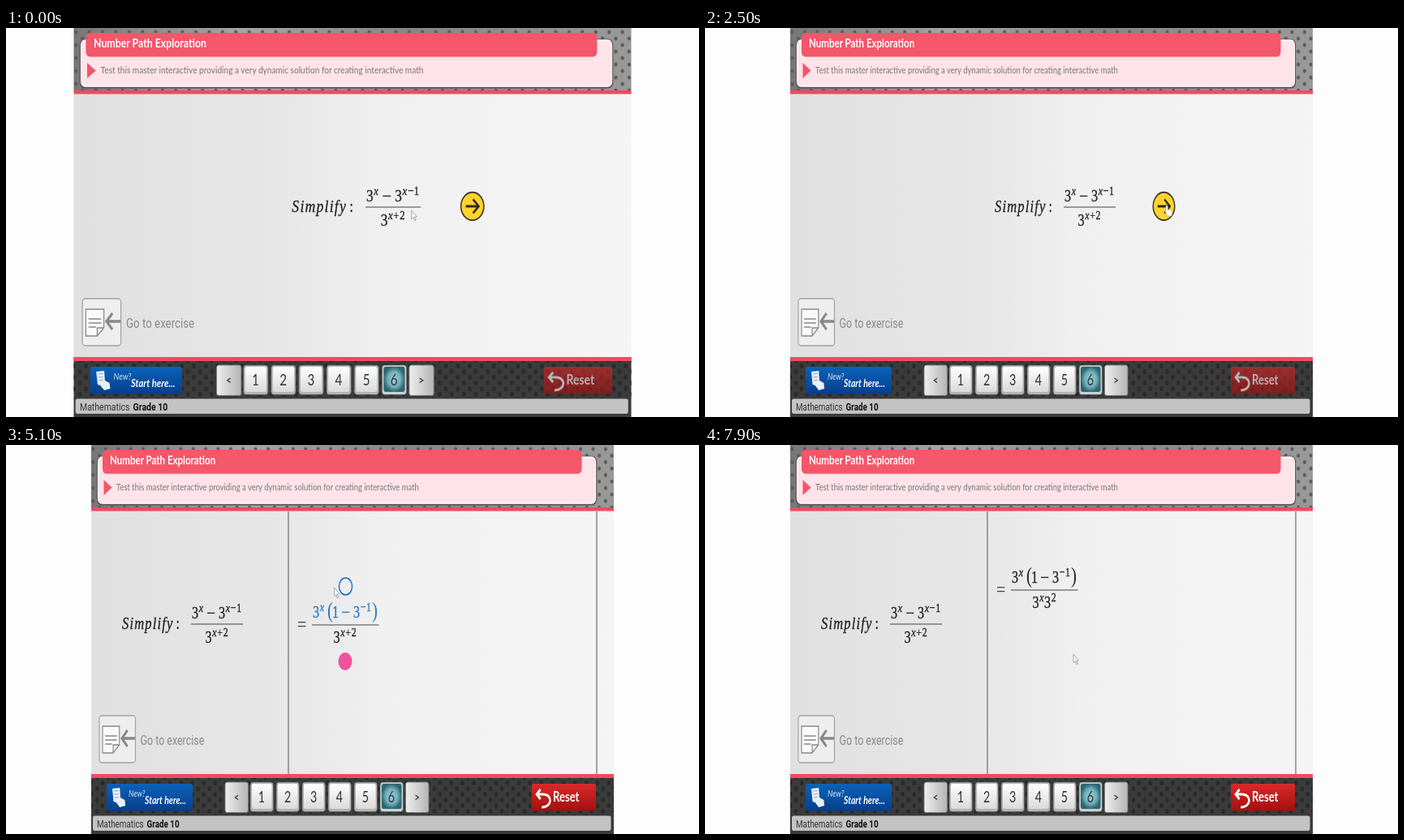
Write an HTML page that moves like this. It is 854 px wide and 480 px high and loops after 8000 ms.

```html
<!DOCTYPE html>
<html lang="en">
<head>
<meta charset="utf-8">
<title>Interactive maths</title>
<style>
html, body { margin: 0; width: 100%; height: 100%; overflow: hidden; background: #fdfdfd; }
svg { display: block; width: 854px; height: 480px; }
text { white-space: pre; }
.ui { font-family: Lato, Carlito, sans-serif; }
.label { font-family: Roboto, sans-serif; }
.math { font-family: "Liberation Serif", "Times New Roman", serif; stroke: currentColor; stroke-width: .35; }
.op { stroke-width: 0; }
.bold { font-weight: 700; }
.italic { font-style: italic; }
</style>
</head>
<body>
<svg viewBox="0 0 854 480">
  <defs>
    <linearGradient id="paper">
      <stop offset="0" stop-color="#e0e0e0"/><stop offset=".4" stop-color="#e8e8e8"/>
      <stop offset=".55" stop-color="#f0f0f0"/><stop offset="1" stop-color="#f5f5f5"/>
    </linearGradient>
    <linearGradient id="steel">
      <stop offset="0" stop-color="#777"/><stop offset=".3" stop-color="#a5a5a5"/>
      <stop offset=".6" stop-color="#858585"/><stop offset="1" stop-color="#999"/>
    </linearGradient>
    <linearGradient id="key" x2="0" y2="1">
      <stop offset="0" stop-color="#fff"/><stop offset="1" stop-color="#dadada"/>
    </linearGradient>
    <linearGradient id="side">
      <stop offset="0" stop-color="#eee"/><stop offset="1" stop-color="#b4b4b4"/>
    </linearGradient>
    <linearGradient id="blue" x2="0" y2="1">
      <stop offset="0" stop-color="#0b62b8"/><stop offset="1" stop-color="#073f8c"/>
    </linearGradient>
    <linearGradient id="red" x2="0" y2="1">
      <stop offset="0" stop-color="#d92a2a"/><stop offset="1" stop-color="#a31010"/>
    </linearGradient>
    <radialGradient id="teal">
      <stop offset="0" stop-color="#9bd0d7"/><stop offset=".6" stop-color="#6fb0ba"/>
      <stop offset="1" stop-color="#2f6570"/>
    </radialGradient>
    <pattern id="holes" width="20" height="16" patternUnits="userSpaceOnUse">
      <g fill="#5a5a5a"><circle cx="5" cy="5" r="2.6"/><circle cx="15" cy="13" r="2.6"/></g>
    </pattern>
    <pattern id="mesh" width="18" height="14" patternUnits="userSpaceOnUse">
      <g fill="#2a2a2a"><circle cx="5" cy="4" r="3"/><circle cx="14" cy="11" r="3"/></g>
    </pattern>
  </defs>
  <g id="stage"></g>
</svg>
<script>
const LOOP = 8000, SQUASH = 0.77, MID = 427;
const INK = '#222', BLUE = '#0e6ac8', PINK = '#f0529f', CORAL = '#f4566a';
const OPEN = 2900, TOP_CLICK = 4900, BOTTOM_CLICK = 6600, SETTLE = 7200;
const stage = document.getElementById('stage');

const u = x => (x - MID) / SQUASH;
const rect = (x, y, w, h, fill, r = 0, extra = '') =>
  `<rect x="${u(x)}" y="${y}" width="${w / SQUASH}" height="${h}" rx="${r}" fill="${fill}" ${extra}/>`;
const text = (x, y, str, size, cls, fill = INK, extra = '') =>
  `<text x="${u(x)}" y="${y}" font-size="${size}" class="${cls}" fill="${fill}" color="${fill}" ${extra}>${str}</text>`;
const line = (x1, y1, x2, y2, width = 1.2, color = '#444') =>
  `<path d="M${u(x1)} ${y1}L${u(x2)} ${y2}" stroke="${color}" stroke-width="${width}"/>`;
const dot = (x, y, color, filled) =>
  `<circle cx="${u(x)}" cy="${y}" r="${filled ? 11 : 10.5}" fill="${filled ? color : 'none'}" stroke="${color}" stroke-width="${filled ? 0 : 1.7}"/>`;
const at = (x, y, body) => `<g transform="translate(${u(x)} ${y})">${body}</g>`;
const group = (id, body) => `<g id="${id}">${body}</g>`;
const centered = 'text-anchor="middle"';

// Maths pieces: digits, operators and exponents share a baseline y.
const num = (x, y, s, c) => text(x, y, s, 21, 'math', c);
const minus = (x, y, c) => text(x, y + 2, '−', 26, 'math op', c);
const equals = (x, y) => text(x, y, '=', 26, 'math op', '#444');
const exp = (x, y, s, c) => text(x, y - 8, s.replace('x', '<tspan class="italic">x</tspan>'), 15.5, 'math', c, 'letter-spacing=".9"');
const power = (x, y, s, c) => num(x, y, '3', c) + exp(x + 8.7, y, s, c);

const startFraction = x =>
  power(x + 1, 214, 'x') + minus(x + 19, 214) + power(x + 34, 214, 'x−1') +
  line(x, 221, x + 64, 221) + power(x + 17.5, 244, 'x+2');
const problem = x =>
  text(x, 227, 'Simplify', 21.5, 'math italic', INK, 'letter-spacing="1.5"') +
  num(x + 66.5, 227, ':') + startFraction(x + 85);
const factored = c =>
  power(378, 213, 'x', c) + text(396, 213, '(', 27, 'math op', c) + num(402, 213, '1', c) +
  minus(413, 213, c) + power(428, 213, '−1', c) + text(451, 213, ')', 27, 'math op', c);
const splitPower = c => power(403.5, 244, 'x', c) + power(418, 244, '2', c);
const longBar = equals(359, 230) + line(377, 222, 459.5, 222);

const header =
  rect(105, 0, 644, 77, 'url(#steel)') + rect(105, 0, 644, 77, 'url(#holes)') +
  rect(113, 15, 614, 58, '#fee3e9', 6, 'stroke="#555" stroke-width="3"') +
  rect(113.5, 15, 613, 57, '#fee3e9', 6, 'stroke="#fff" stroke-width="1.5"') +
  rect(119, 6, 590.5, 29.5, CORAL, 6) +
  text(128, 24.5, 'Number Path Exploration', 15, 'ui bold', '#fff') +
  at(120.5, 52.5, `<path d="M0-9.5L13 0L0 9.5Z" fill="${CORAL}"/>`) +
  text(136, 56.5, 'Test this master interactive providing a very dynamic solution for creating interactive math', 12.3, 'ui', '#777') +
  rect(105, 77, 644, 4.5, '#ee4b62');

const exercise =
  rect(115, 334, 44.5, 58, '#eeeeee', 4, 'stroke="#a2a2a2" stroke-width="1.5"') +
  at(119, 347, '<path d="M0 0H27V23L17 33H0ZM27 23H17V33" fill="#fafafa" stroke="#888" stroke-width="1.5"/><path d="M4 12H23M4 17H23M4 22H15" stroke="#888" stroke-width="1.7"/>') +
  at(142, 362, '<path d="M22 0H2M10-10L1 0L10 10" fill="none" stroke="#888" stroke-width="3.4"/>') +
  text(165.5, 370, 'Go to exercise', 16.2, 'label', '#8a8a8a');

const pageKey = n => {
  const x = 283 + n * 32, active = n === 6;
  return rect(x - 14, 416, 28.5, 36.5, active ? '#c4d3d6' : '#b5b5b5', 4, 'stroke="#555" stroke-width=".8"') +
    rect(x - 12, 418, 24.5, 31, active ? 'url(#teal)' : 'url(#key)', 3) +
    text(x, 441, n, 18.5, 'ui', '#333', centered);
};
const sideKey = (x, s) => rect(x - 14, 416, 28.5, 37.5, 'url(#side)', 3, 'stroke="#777"') +
  text(x, 440, s, 15, 'ui bold', '#444', centered);

const footer =
  rect(105, 406, 644, 74, '#3b3b3b') + rect(105, 411, 644, 46, 'url(#mesh)') +
  rect(105, 406, 644, 5, '#ee4b62') +
  rect(124, 418, 106, 33.5, 'url(#blue)', 3) +
  at(131, 423, '<path d="M0 1L12 0L13 12L20 15L21 22L12 24L6 18L2 17Z" fill="#e9eff6"/><path d="M3 4L10 3.5M3 8L10 7.5M4 12L10 11.5" stroke="#8ea6bd" stroke-width="1.2"/>') +
  text(151, 434, 'New?', 11.5, 'ui italic', '#d8e5f5') +
  text(171, 443, 'Start here...', 13.6, 'ui italic bold', '#fff') +
  sideKey(284, '&lt;') + [1, 2, 3, 4, 5, 6].map(pageKey).join('') + sideKey(506.5, '&gt;') +
  group('reset',
    rect(648, 418, 79, 33.5, 'url(#red)', 3) +
    at(652.5, 424, '<path d="M8 1L2 7L8 13M2 7H12C28 7 27 23 10 23" fill="none" stroke="#fff" stroke-width="3.2"/>') +
    text(674, 440.5, 'Reset', 17, 'ui bold', '#fff')) +
  rect(107, 457.5, 638.5, 18.5, '#c3c3c3', 3) +
  text(112, 472.5, 'Mathematics', 12.8, 'label', '#333') +
  text(173.5, 472.5, 'Grade 10', 12.8, 'label bold', '#111');

const cursors =
  group('arrow', '<path d="M0 0V11L3 8.5L5 13L7 12L5 8H8.5Z" fill="#f6f6f6" stroke="#999" stroke-width=".9"/>') +
  group('hand', '<path d="M0 1Q2-1 3 1V5L9 6Q11 7 10 10L9 13H3L-2 7Q-1 5 0 7Z" fill="#fff" stroke="#999" stroke-width=".5"/>');

stage.innerHTML =
  rect(105, 81, 644, 326, 'url(#paper)') + header + exercise + footer +
  group('intro', problem(357) +
    at(565.5, 220, '<circle r="17.2" fill="#ffd32f" stroke="#44392a" stroke-width="2"/><path d="M-10 0H9M1-8.5L9.5 0L1 8.5" fill="none" stroke="#30291e" stroke-width="2.8"/>')) +
  group('work', problem(143) + line(348, 82, 348, 406, 1.5, '#666') + line(728, 82, 728, 406, 1.5, '#666')) +
  group('first', equals(359, 230) + startFraction(377) + dot(408.5, 175, BLUE, true) + dot(408.5, 265, PINK, true)) +
  group('second', longBar + factored('#2577c8') + power(403.5, 244, 'x+2') +
    dot(418.5, 174.5, BLUE, false) + dot(418, 267, PINK, true)) +
  group('third', longBar + factored('#2577c8') + splitPower(PINK) +
    dot(418.5, 174.5, BLUE, false) + dot(418, 267, PINK, false)) +
  group('last', longBar + factored(INK) + splitPower(INK)) +
  group('cursor', cursors);

const el = id => document.getElementById(id);
const show = (id, on) => el(id).setAttribute('display', on ? 'inline' : 'none');
const clamp = p => Math.max(0, Math.min(1, p));
const smooth = p => p * p * (3 - 2 * p);

// Pointer stops: time, x, y.
const path = [
  [0, 495, 225], [600, 495, 225], [1500, 562, 225], [2000, 562, 225], [2400, 568, 219],
  [2900, 568, 219], [3250, 562, 219], [3500, 562, 219], [4200, 404, 172], [5000, 404, 172],
  [5800, 416, 263], [6700, 416, 263], [7500, 454, 258], [LOOP, 454, 258]
];
function pointer(t) {
  const i = path.findIndex(p => p[0] > t);
  const [a, b] = [path[i - 1], path[i]];
  const p = smooth((t - a[0]) / (b[0] - a[0]));
  return [a[1] + (b[1] - a[1]) * p, a[2] + (b[2] - a[2]) * p];
}

function draw(t) {
  const zoom = 1 + 0.067 * (1 - clamp(t / 700)) ** 2;
  stage.setAttribute('transform', `translate(${MID} 0) scale(${SQUASH * zoom} 1)`);
  show('intro', t < OPEN);
  show('work', t >= OPEN);
  show('first', t >= OPEN && t < TOP_CLICK);
  show('second', t >= TOP_CLICK && t < BOTTOM_CLICK);
  show('third', t >= BOTTOM_CLICK && t < SETTLE);
  show('last', t >= SETTLE);
  el('last').setAttribute('transform', `translate(0 ${-43 * smooth(clamp((t - SETTLE) / 300))})`);
  el('reset').setAttribute('opacity', t < OPEN ? 0.62 : 1);

  const [x, y] = pointer(t);
  const hover = (cx, cy, r) => Math.hypot((x - cx) / SQUASH, y - cy) < r;
  const hand = t < OPEN ? hover(565.5, 220, 18)
    : t < TOP_CLICK ? hover(408.5, 175, 11) || hover(408.5, 265, 11)
    : t < SETTLE && (hover(418.5, 174.5, 11) || hover(418, 267, 11));
  el('cursor').setAttribute('transform', `translate(${u(x)} ${y})`);
  show('hand', hand);
  show('arrow', !hand);
}

function tick() {
  draw(performance.now() % LOOP);
  requestAnimationFrame(tick);
}
tick();
</script>
</body>
</html>
```
